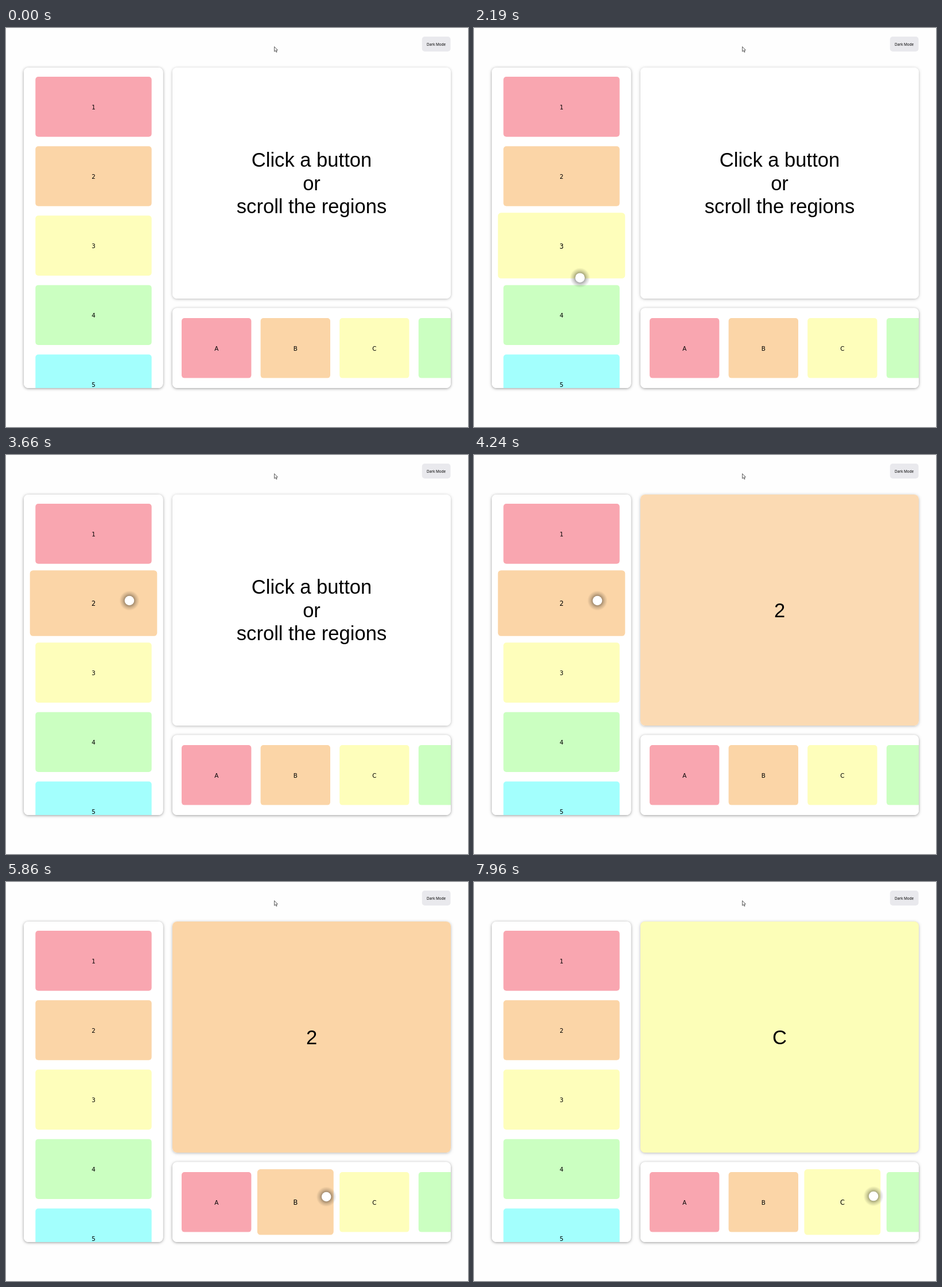
An HTML page with a canvas for the animation above (7.99 s loop, 805x696 px).

```html
<!DOCTYPE html>
<html lang="en">
<head>
<meta charset="utf-8">
<title>Scroll regions</title>
<style>
html, body { margin: 0; width: 100%; height: 100%; overflow: hidden; background: #fefefe; }
canvas { display: block; }
</style>
</head>
<body>
<canvas id="stage" width="805" height="696"></canvas>
<script>
const ctx = document.getElementById('stage').getContext('2d');
const LOOP = 7990, HOVER_MS = 200, FADE_MS = 300, GROWTH = 0.095;
const COLORS = ['#f9a6b0', '#fbd5a7', '#fefebb', '#cbffc1', '#a3fffd'];

// key points of the touch point; it glides smoothly between them
const PATH = [
  { t: 970, x: 402, y: 722 },
  { t: 1440, x: 445, y: 370 },
  { t: 1740, x: 258, y: 334 },
  { t: 2160, x: 187, y: 430 },
  { t: 2680, x: 181, y: 502 },
  { t: 2910, x: 188, y: 410 },
  { t: 3660, x: 215, y: 254 },
  { t: 4590, x: 215, y: 254 },
  { t: 4900, x: 233, y: 443 },
  { t: 5380, x: 428, y: 552 },
  { t: 5860, x: 558, y: 549 },
  { t: 6670, x: 640, y: 552 },
  { t: 7590, x: 640, y: 552 },
  { t: LOOP, x: 697, y: 548 }
];

const SCREENS = [
  { at: -FADE_MS, color: '#ffffff', lines: ['Click a button', 'or', 'scroll the regions'] },
  { at: 4070, color: COLORS[1], lines: ['2'] },
  { at: 6885, color: '#fcfeb8', lines: ['C'] }
];

const makeCards = (labels, x, y, w, h, dx, dy) => [...labels].map((label, i) =>
  ({ label, w, h, cx: x + w / 2 + i * dx, cy: y + h / 2 + i * dy, color: COLORS[i], hovers: [] }));
const column = makeCards('12345', 51.3, 85.1, 202.4, 104.6, 0, 121.1);
const row = makeCards('ABCD', 306, 506, 121.4, 104.6, 137.6, 0);

const clamp = v => Math.max(0, Math.min(1, v));

// cubic-bezier(.25, .1, .25, 1)
function ease(x) {
  x = clamp(x);
  let lo = 0, hi = 1;
  for (let i = 0; i < 18; i++) {
    const u = (lo + hi) / 2, v = 1 - u;
    if (0.75 * u * v * v + 0.75 * u * u * v + u ** 3 < x) lo = u; else hi = u;
  }
  const v = 1 - lo;
  return 0.3 * lo * v * v + 3 * lo * lo * v + lo ** 3;
}

function slope(i, axis) {
  const a = PATH[i - 1], b = PATH[i], c = PATH[i + 1];
  const resting = (p, q) => p.x === q.x && p.y === q.y;
  if (!a || !c || resting(a, b) || resting(b, c)) return 0;
  return (c[axis] - a[axis]) / (c.t - a.t);
}

function pointAt(t) {
  const i = Math.max(0, PATH.findLastIndex((p, k) => p.t <= t && k < PATH.length - 1));
  const a = PATH[i], b = PATH[i + 1], span = b.t - a.t;
  const u = clamp((t - a.t) / span), v = 1 - u;
  return ['x', 'y'].map(k =>
    (1 + 2 * u) * v * v * a[k] + u * v * v * span * slope(i, k) +
    u * u * (3 - 2 * u) * b[k] - u * u * v * span * slope(i + 1, k));
}

// Follow the path once and note when it enters and leaves each card.
function findHovers(card) {
  let open = null;
  for (let t = 0; t <= LOOP; t += 5) {
    const [x, y] = pointAt(t);
    const reach = (open ? 1 + GROWTH : 1) / 2;
    const inside = Math.abs(x - card.cx) < card.w * reach && Math.abs(y - card.cy) < card.h * reach;
    if (inside && !open) {
      open = { enter: t, leave: Infinity };
      card.hovers.push(open);
    } else if (!inside && open) {
      open.leave = t;
      open = null;
    }
  }
}
[...column, ...row].forEach(findHovers);

const hoverAmount = (card, t) => Math.max(0, ...card.hovers.map(({ enter, leave }) =>
  ease((t - enter) / HOVER_MS) * (1 - ease((t - leave) / HOVER_MS))));

function box(x, y, w, h, r, fill) {
  ctx.beginPath();
  ctx.roundRect(x, y, w, h, r);
  ctx.fillStyle = fill;
  ctx.fill();
}

function text(str, x, y, font) {
  ctx.font = font;
  ctx.fillStyle = '#000';
  ctx.textAlign = 'center';
  ctx.fillText(str, x, y);
}

function panel(x, y, w, h, shade) {
  ctx.save();
  ctx.shadowColor = `rgba(0,0,0,${shade})`;
  ctx.shadowBlur = 5;
  ctx.shadowOffsetY = 1;
  box(x, y, w, h, 8, '#fff');
  ctx.restore();
}

function drawCard(card, t) {
  const scale = 1 + GROWTH * hoverAmount(card, t);
  ctx.save();
  ctx.translate(card.cx, card.cy);
  ctx.scale(scale, scale);
  box(-card.w / 2, -card.h / 2, card.w, card.h, 5, card.color);
  text(card.label, 0, 4.5, '10.4px "DejaVu Sans", sans-serif');
  ctx.restore();
}

function region(x, y, w, h, cards, t) {
  panel(x, y, w, h, 0.4);
  ctx.save();
  box(x, y, w, h, 8, '#fff');
  ctx.clip();
  cards.forEach(card => drawCard(card, t));
  ctx.restore();
}

function mainPanel(x, y, w, h, t) {
  const i = SCREENS.findLastIndex(s => t >= s.at);
  const { at, color, lines } = SCREENS[i];
  panel(x, y, w, h, 0.27);
  if (i > 0) box(x, y, w, h, 8, SCREENS[i - 1].color);
  ctx.globalAlpha = ease((t - at) / FADE_MS);
  box(x, y, w, h, 8, color);
  ctx.globalAlpha = 1;
  lines.forEach((line, k) => text(line, x + w / 2,
    282.8 + (k - (lines.length - 1) / 2) * 40.5,
    '34.6px "Liberation Sans", Arial, sans-serif'));
}

function arrow(x, y) {
  ctx.save();
  ctx.translate(x, y);
  const shape = new Path2D('M0 0V8.4L1.9 6.7L3.3 9.7L4.6 9L3.2 6.2L5.7 6Z');
  ctx.fillStyle = '#fff';
  ctx.fill(shape);
  ctx.strokeStyle = '#333';
  ctx.lineWidth = 0.8;
  ctx.stroke(shape);
  ctx.restore();
}

function disc(x, y, r, fill) {
  ctx.beginPath();
  ctx.arc(x, y, r, 0, Math.PI * 2);
  ctx.fillStyle = fill;
  ctx.fill();
}

function touchPoint(t) {
  if (t < PATH[0].t) return;
  const [x, y] = pointAt(t);
  const halo = ctx.createRadialGradient(x, y, 7, x, y, 17.5);
  halo.addColorStop(0, 'rgba(0,0,0,.4)');
  halo.addColorStop(0.5, 'rgba(0,0,0,.16)');
  halo.addColorStop(1, 'rgba(0,0,0,0)');
  disc(x, y, 17.5, halo);
  disc(x, y, 8.3, '#fff');
}

function draw(t) {
  ctx.fillStyle = '#fefefe';
  ctx.fillRect(0, 0, 805, 696);
  box(724.8, 15, 49.8, 26, 5, '#e9e9ed');
  text('Dark Mode', 749.6, 30.8, '6.4px "Noto Sans", sans-serif');
  region(31, 69, 242.6, 559, column, t);
  mainPanel(290, 69, 485, 403, t);
  region(290, 488.5, 485, 139.5, row, t);
  arrow(467.6, 32.6);
  touchPoint(t);
}

const start = performance.now();
function tick() {
  draw((performance.now() - start) % LOOP);
  requestAnimationFrame(tick);
}
tick();
</script>
</body>
</html>
```
